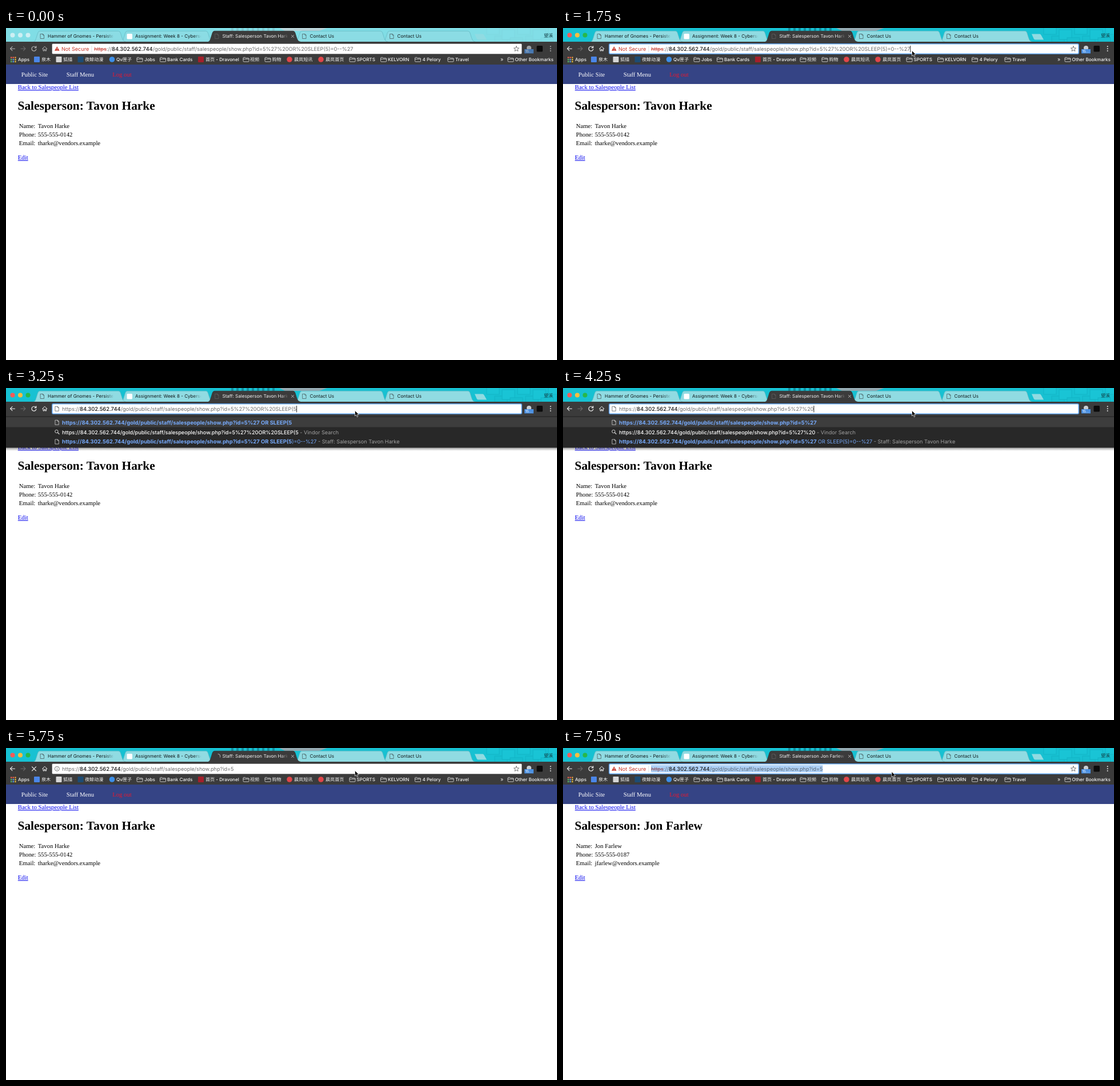
An HTML page that plays this animation: 964 by 581 pixels, repeating every 8 s.

```html
<!DOCTYPE html>
<html lang="en">
<head>
<meta charset="utf-8">
<title>Address bar</title>
<style>
  html, body { margin: 0; width: 100%; height: 100%; overflow: hidden; background: #fff; }
  svg { display: block; width: 964px; height: 581px; }
  text { white-space: pre; text-rendering: geometricPrecision;
    font-family: Inter, "Noto Sans CJK SC", "Noto Sans CJK", sans-serif; }
  .serif { font-family: "Liberation Serif", "Times New Roman", serif; font-size: 10.71px; }
  .link { fill: #0000ee; text-decoration: underline; }
  .line { fill: none; stroke-linecap: round; stroke-linejoin: round; }
</style>
</head>
<body>
<svg id="stage" viewBox="0 0 964 581"></svg>
<script>
const stage = document.getElementById('stage');
const LOOP = 8000, URL_SIZE = 9.15;
const HOST = '84.302.562.744';
const PATH = '/gold/public/staff/salespeople/show.php?id=5';
const TAIL = '%27%20OR%20SLEEP(5)=0--%27';
const BAR = '#3b3b3b', LIGHT = '#f1f1f1';

const people = [
  { name: 'Tavon Harke', phone: '555-555-0142', email: 'tharke@vendors.example' },
  { name: 'Jon Farlew', phone: '555-555-0187', email: 'jfarlew@vendors.example' }
];

// Each step overrides part of the state; tail = kept characters of TAIL.
const steps = [
  [0, { active: false, mode: 'page', chip: 1, tail: 26, focus: false, select: false,
        caret: false, pointer: null, person: 0, tab: 0 }],
  [250, { pointer: [578, -5] }],
  [500, { pointer: [595.5, 40.5] }],
  [750, { pointer: [610, 39] }],
  [1000, { active: true, focus: true, select: true }],
  [1750, { select: false, caret: true }],
  [2250, { mode: 'edit', chip: 0, tail: 25 }],
  [2750, { tail: 24 }],
  [3000, { tail: 21 }],
  [3250, { tail: 18 }],
  [3500, { tail: 15 }],
  [3750, { tail: 12 }],
  [4000, { tail: 9 }],
  [4250, { tail: 6 }],
  [4500, { tail: 3 }],
  [4750, { tail: 1 }],
  [5250, { tail: 0 }],
  [5750, { mode: 'load', focus: false, caret: false }],
  [6000, { mode: 'page', chip: 0.41, person: 1 }],
  [6250, { chip: 1, tab: 1 }],
  [6750, { pointer: [586, 37.5] }],
  [7000, { pointer: [574.5, 41] }],
  [7250, { focus: true, select: true }]
];

const rect = (x, y, w, h, fill, more = '') =>
  `<rect x="${x}" y="${y}" width="${w}" height="${h}" fill="${fill}" ${more}/>`;
const dot = (x, y, r, fill, more = '') =>
  `<circle cx="${x}" cy="${y}" r="${r}" fill="${fill}" ${more}/>`;
const line = (d, color, width = 1, more = '') =>
  `<path class="line" d="${d}" stroke="${color}" stroke-width="${width}" ${more}/>`;
// Sans text, centred vertically on its capitals
const label = (x, y, s, size, fill, more = '') =>
  `<text x="${x}" y="${y + 0.364 * size}" font-size="${size}" fill="${fill}" ${more}>${s}</text>`;
const serif = (x, y, s, more = '') => `<text class="serif" x="${x}" y="${y}" ${more}>${s}</text>`;
const span = (s, fill, more = '') => `<tspan fill="${fill}" ${more}>${s}</tspan>`;
const move = (x, y, s) => `<g transform="translate(${x} ${y})">${s}</g>`;

const sheet = (x, y, color) =>
  move(x, y, line('M-3,-4 H1 L3,-2 V4 H-3 Z M1,-4 V-2 H3', color, 0.8));
const folder = x =>
  move(x, 51, line('M.5,1.5 Q.5,.5 1.5,.5 H4 L5,1.7 H9.5 Q10.5,1.7 10.5,2.7 V7 Q10.5,8 9.5,8 H1.5 Q.5,8 .5,7 Z M.5,3.3 H10.5',
    '#e4e4e4', 0.8));

const fade = (id, color) =>
  `<linearGradient id="${id}" gradientUnits="userSpaceOnUse" x1="126" x2="140" y1="0" y2="0">
    <stop stop-color="${color}"/><stop offset="1" stop-color="${color}" stop-opacity="0"/></linearGradient>`;

const defs = `<defs>${fade('darkFade', '#10181a')}${fade('lightFade', LIGHT)}
  <linearGradient id="shade" x2="0" y2="1"><stop stop-color="#000" stop-opacity=".4"/>
  <stop offset="1" stop-color="#000" stop-opacity="0"/></linearGradient></defs>`;

function titleBar(s) {
  let out = rect(0, 0, 964, 25, '#17c1d2');
  for (let i = 0; i < 5; i++) {
    out += rect(841 + i * 27, i % 2 ? 3 : -6, 22, 17, '#19c4d5', 'stroke="#13b4c6" stroke-width="1"');
    out += rect(855 + i * 27, i % 2 ? 17 : 14, 22, 12, '#17bfd0', 'stroke="#13b4c6" stroke-width="1"');
  }
  for (let i = 0; i < 9; i++) out += rect(394 + i * 9, 0, 4, 5, '#128fa1');
  out += '<path d="M478,0 H562 L548,5 H488 Z" fill="#93a9b1"/>';
  if (!s.active) out += rect(0, 0, 964, 25, '#d8f4f6', 'opacity=".55"');
  ['#fc5b57', '#fdbd3e', '#28b84a'].forEach((c, i) => {
    out += dot(11.5 + i * 13.5, 12.5, 4, s.active ? c : '#cdeff3');
  });
  return out + label(941, 13, '望溪', 8, '#123c42');
}

function tab(x, title, icon, s, current) {
  const edge = 'M0,24 C3,23.5 3.5,20 7,9 Q8,5.3 11,5.3 H148 Q151,5.3 152,9 C155.5,20 156,23.5 161,24';
  const fill = current ? BAR : s.active ? '#90dbe2' : '#8bdce4';
  return move(x, 0, `<path d="${edge}" fill="${fill}" stroke="${current ? '#333' : '#62b6c0'}" stroke-width=".7"/>`
    + icon + label(24.5, 14.5, title, 8.05, `url(#${current ? 'lightFade' : 'darkFade'})`));
}

function tabs(s) {
  const page = sheet(15, 14.5, '#4d6266');
  const busy = s.mode === 'load'
    ? line('M17,10.5 A4,4 0 0 1 20.5,16', '#a5a5a5', 1.1) : sheet(15, 14.5, '#5f5f5f');
  return tab(660, 'Contact Us', page, s) + tab(507, 'Contact Us', page, s)
    + tab(201.5, 'Assignment: Week 8 - Cybersecurity', rect(10, 10, 9.5, 9.5, '#fff', 'rx="1.5"'), s)
    + tab(48.5, 'Hammer of Gnomes - Persistent Notes', page, s)
    + '<path d="M820,10.5 H834 Q835.5,10.5 836.5,12.5 L841,20.5 H826 Q824.5,20.5 823.5,18.5 Z" fill="#90dbe2"/>'
    + tab(354, 'Staff: Salesperson ' + people[s.tab].name, busy, s, true)
    + line('M499.5,12.5 L503.5,16.5 M503.5,12.5 L499.5,16.5', '#c9c9c9', 0.9);
}

function toolbar(s) {
  const ink = s.active ? '#eeeeee' : '#b4b4b4';
  const reload = s.mode === 'load'
    ? 'M45.5,32.8 L52.5,39.8 M52.5,32.8 L45.5,39.8'
    : 'M52.2,33.8 A4,4 0 1 0 52.9,37.2 M52.8,31.8 V34.6 H50';
  let out = rect(0, 24, 964, 40, BAR)
    + line('M15.5,36.2 H7.5 M11,32.7 L7.5,36.2 L11,39.7', ink, 1.1)
    + line('M26,36.2 H34 M30.5,32.7 L34,36.2 L30.5,39.7', '#6d6d6d', 1.1)
    + line(reload, ink, 1.2)
    + line('M63.5,36.5 L67.7,32.2 L72,36.5 M65,36 V40 H67 V37.5 H68.5 V40 H70.5 V36', ink, 1);
  out += `<g opacity="${s.active ? 1 : 0.7}">` + dot(915, 35, 4, '#c9ced2')
    + rect(907, 37, 16, 7.5, '#4a8fe0') + label(908.5, 40.5, '15...', 6.4, '#fff') + '</g>'
    + rect(928.5, 31, 10.5, 10.5, '#0b0b0b', 'rx="1.5"');
  [32.3, 36.2, 40.1].forEach(y => { out += dot(952.7, y, 1, ink); });
  return out;
}

function bookmarks() {
  const sq = c => x => rect(x, 50, 10, 10, c, 'rx="1"');
  const disc = c => x => dot(x + 5, 55, 4.8, c);
  const grid = x => [0, 1, 2, 3, 4, 5, 6, 7, 8].map(i =>
    rect(x + (i % 3) * 3.6, 50.5 + Math.floor(i / 3) * 3.6, 2.4, 2.4,
      ['#e8604c', '#e8604c', '#e5a03c', '#57b26a', '#5a96e6', '#e5b83c', '#57b26a', '#5a96e6', '#e5b83c'][i])).join('');
  const items = [
    [8, 21, 'Apps', grid], [49, 62, '泉木', sq('#4b86e8')], [87.5, 100, '狐描', sq('#d6d6d6')],
    [125.5, 138, '夜鲸动漫', sq('#1d4c74')], [180.5, 193, 'Qv匣子', disc('#3d8fe8')],
    [228.5, 242, 'Jobs'], [269, 282, 'Bank Cards'], [336, 349, '首页 - Dravonel', sq('#a3202b')],
    [414.5, 427, '视频'], [452.5, 465.5, '购物'], [491, 504, '晨岚短讯', disc('#e0464a')],
    [546, 559, '晨岚首页', disc('#e0464a')], [600.5, 613.5, 'SPORTS'], [655, 668, 'KELVORN'],
    [715, 728.5, '4 Pelory'], [772.5, 786, 'Travel'], [877.5, 890.5, 'Other Bookmarks']
  ];
  return items.map(([x, tx, name, icon = folder]) =>
    icon(x) + label(tx, 55, name, 8.1, '#f4f4f4', 'font-weight="500"')).join('')
    + label(865, 54.5, '»', 9, '#eee');
}

function address(s) {
  const x = 98 + 56 * s.chip, warn = s.chip > 0;
  const grey = s.select ? '#566473' : '#6c6c6c', red = s.select ? '#8e5560' : '#c9453a';
  let out = s.focus
    ? rect(80.75, 27.75, 821.5, 17.5, '#fff', 'rx="2" stroke="#5b9ee6" stroke-width="1.5"')
    : rect(80.3, 27.3, 822.4, 18.4, '#fff', 'rx="2" stroke="#2c2c2c" stroke-width=".6"');
  if (warn) {
    out += `<clipPath id="chip"><rect x="82" y="28" width="${x - 86}" height="17"/></clipPath>
      <g clip-path="url(#chip)" opacity="${s.chip < 1 ? 0.5 : 1}">
      <path d="M89.3,32.2 L93.6,39.8 H85 Z" fill="#c9392b"/>`
      + rect(88.9, 34.8, 0.9, 2.4, '#fff') + rect(88.9, 38, 0.9, 0.9, '#fff')
      + label(97, 36.5, 'Not Secure', URL_SIZE, '#c9392b') + '</g>';
    if (s.chip === 1) out += rect(149.5, 31, 0.8, 11, '#dadada');
  } else if (s.mode === 'load') {
    out += dot(89.3, 36.3, 4, 'none', 'stroke="#666" stroke-width=".9"')
      + rect(88.9, 35.7, 0.9, 2.8, '#666') + rect(88.9, 33.9, 0.9, 0.9, '#666');
  } else out += sheet(89.3, 36.3, '#666');
  if (s.select) out += rect(x, 30, 0, 12.5, '#aed1f7', 'id="marked"');
  out += label(x, 36.5,
    span('https', warn ? red : grey, warn ? 'text-decoration="line-through"' : '')
    + span('://', grey)
    + span(HOST, '#161616', 'font-weight="500" font-size="9.35"')
    + span(PATH + TAIL.slice(0, s.tail), grey), URL_SIZE, grey, 'id="typed"');
  if (s.caret) out += rect(x, 31, 0.9, 11.5, '#111', 'id="caret"');
  if (s.mode !== 'edit')
    out += line('M893,31.8 L894.3,34.9 L897.6,35.1 L895,37.2 L895.9,40.5 L893,38.7 L890.1,40.5 L891,37.2 L888.4,35.1 L891.7,34.9 Z', '#6a6a6a', 0.9);
  return out;
}

function suggestions(s) {
  const base = 'https://' + HOST + PATH, tail = TAIL.slice(0, s.tail);
  const plain = t => t.replaceAll('%20', ' ');
  const bold = t => span(t, '#76a9fa', 'font-weight="700" font-size="9.45"');
  const thin = t => span(t, '#76a9fa');
  const note = t => span(' - ' + t, '#a0a0a0');
  const staff = i => note('Staff: Salesperson ' + people[i].name);
  const full = plain(TAIL), typed = plain(tail);
  let same = 0;
  while (same < typed.length && typed[same] === full[same]) same++;

  const first = bold(base + typed.trimEnd()) + (s.tail ? '' : staff(1));
  let third = bold(base + full.slice(0, same)) + thin(full.slice(same)) + staff(0);
  if (s.tail === 1) third = bold(base) + staff(1);
  if (s.tail === 0) third = bold(base) + thin('%27');

  const row = (y, t) => label(98, y, t, URL_SIZE, '#fff');
  return rect(0, 104, 964, 6, 'url(#shade)') + rect(0, 50, 964, 54.5, '#282828')
    + rect(0, 51, 964, 17.5, '#3d3d3d') + rect(0, 49.5, 964, 1, '#2b2b2b')
    + sheet(89.3, 60.3, '#cfcfcf') + sheet(89.3, 94, '#cfcfcf')
    + dot(88.4, 76, 2.7, 'none', 'stroke="#d0d0d0" stroke-width="1"') + line('M90.5,78 L93,80.5', '#d0d0d0', 1.2)
    + row(60.3, first)
    + row(77.2, span(base + tail, '#fff', 'font-weight="500"') + note('Vindor Search'))
    + row(94, third);
}

function page(s) {
  const p = people[s.person];
  const rows = [['Name:', p.name], ['Phone:', p.phone], ['Email:', p.email]];
  return rect(0, 64, 964, 34, '#354485')
    + serif(26.7, 85, 'Public Site', 'fill="#fff"') + serif(105.8, 85, 'Staff Menu', 'fill="#fff"')
    + serif(186.2, 85, 'Log out', 'fill="#e6192f"')
    + `<text class="serif link" x="20.8" y="107.3">Back to Salespeople List</text>`
    + serif(20.5, 143.3, 'Salesperson: ' + p.name, 'style="font-size:21.42px;font-weight:700"')
    + rows.map(([k, v], i) => serif(22.8, 174.8 + i * 14.9, k) + serif(55.7, 174.8 + i * 14.9, v)).join('')
    + `<text class="serif link" x="20.8" y="230.3">Edit</text>`;
}

const arrow = ([x, y]) => move(x, y,
  '<path d="M.5,.5 V10 L2.6,8 L4.2,11.7 L5.8,11 L4.2,7.4 H7.3 Z" fill="#000" stroke="#fff" stroke-width=".7"/>');

function draw(s) {
  stage.innerHTML = defs + rect(0, 0, 964, 581, '#fff') + titleBar(s) + tabs(s) + toolbar(s)
    + bookmarks() + page(s) + address(s)
    + (s.mode === 'edit' ? suggestions(s) : '') + (s.pointer ? arrow(s.pointer) : '');
  const typed = document.getElementById('typed'), length = typed.getComputedTextLength();
  const marked = document.getElementById('marked'), caret = document.getElementById('caret');
  if (marked) marked.setAttribute('width', length);
  if (caret) caret.setAttribute('x', +typed.getAttribute('x') + length);
}

const states = [];
for (const [, change] of steps) states.push({ ...states.at(-1), ...change });

let shown = -1;
function tick() {
  const t = performance.now() % LOOP;
  const now = steps.findLastIndex(([at]) => at <= t);
  if (now !== shown) draw(states[shown = now]);
  requestAnimationFrame(tick);
}
tick();
</script>
</body>
</html>
```
